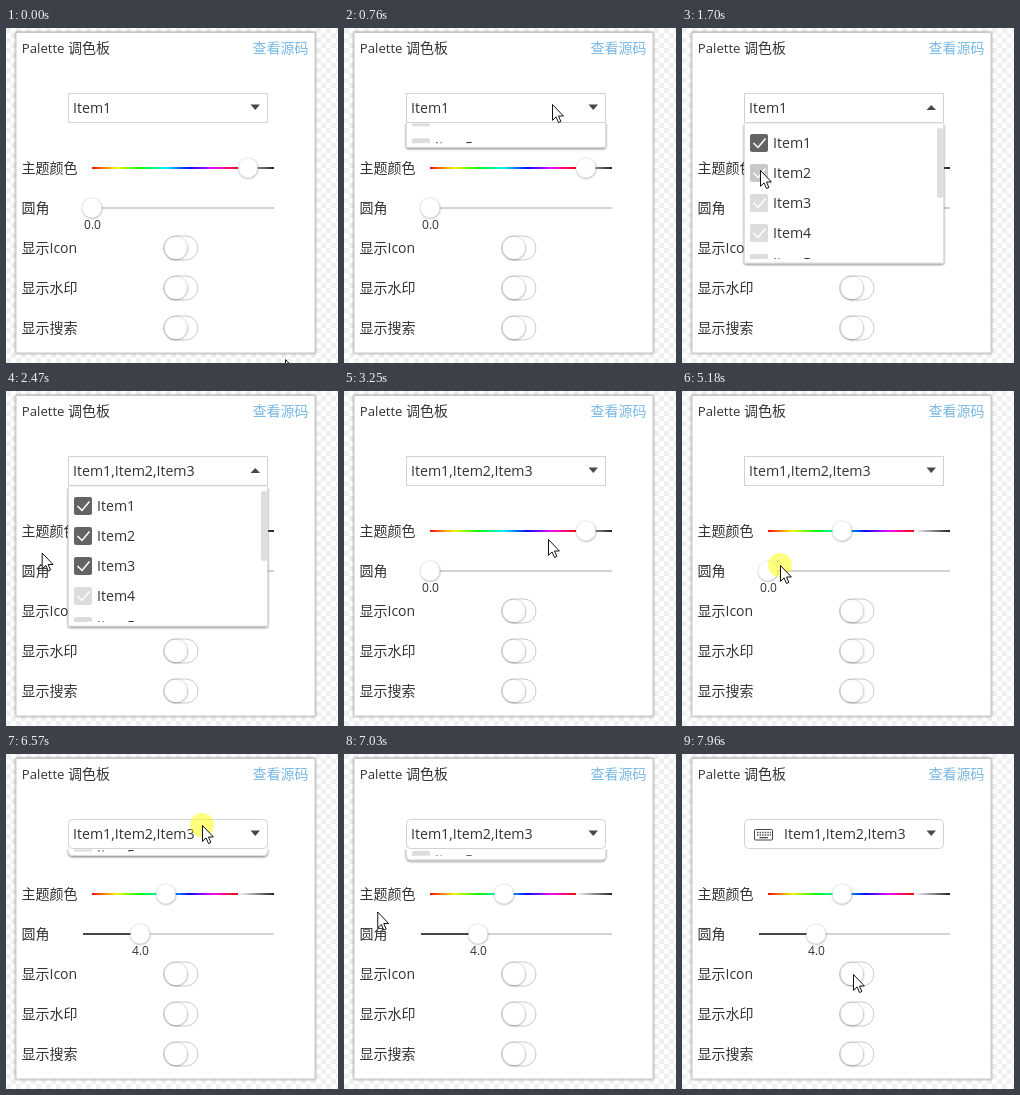
An HTML page for the animation above (8000 ms loop, 332 by 335 pixels).

```html
<!DOCTYPE html>
<html lang="zh">
<head>
<meta charset="utf-8">
<style>
html, body { margin: 0; width: 100%; height: 100%; overflow: hidden; background: #fff; }
svg { display: block; width: 332px; height: 335px; }
text { font-family: "Open Sans", "Noto Sans CJK SC", "Noto Sans CJK", sans-serif; font-size: 14px; fill: #333; }
.item { font-size: 14.2px; }
.value { font-size: 12px; text-anchor: middle; }
.knob { fill: #fff; filter: url(#soft); }
</style>
</head>
<body>
<svg viewBox="0 0 332 335">
  <defs>
    <pattern id="checks" width="10" height="10" patternUnits="userSpaceOnUse">
      <path d="M0 0h5v5h-5zM5 5h5v5h-5z" fill="#f0f0f0"/>
    </pattern>
    <linearGradient id="hues"></linearGradient>
    <linearGradient id="greys"><stop stop-color="#fff"/><stop offset="1" stop-color="#222"/></linearGradient>
    <filter id="soft" x="-30%" y="-30%" width="160%" height="160%">
      <feDropShadow dx="0.2" dy="0.5" stdDeviation="1.3" flood-opacity=".5"/>
    </filter>
    <filter id="drop" x="-5%" y="-5%" width="110%" height="112%">
      <feDropShadow dx="0" dy="1.2" stdDeviation="1.3" flood-opacity=".5"/>
    </filter>
    <filter id="edge" x="-3%" y="-3%" width="106%" height="106%">
      <feDropShadow dx="0" dy="0" stdDeviation="1.3" flood-opacity=".5"/>
    </filter>
    <clipPath id="below"><rect x="50" y="95.5" width="225" height="160"/></clipPath>
    <clipPath id="view"><rect x="62" y="97" width="200" height="134"/></clipPath>
  </defs>

  <rect width="332" height="335" fill="url(#checks)"/>
  <rect x="10" y="4.5" width="299" height="320.5" fill="#fff" stroke="#c8c8c8" filter="url(#edge)"/>

  <text x="15.8" y="25" style="font-size:13.2px">Palette</text>
  <text x="62" y="25">调色板</text>
  <text x="246.5" y="25" style="fill:#79b8e6">查看源码</text>
  <g id="labels"></g>

  <rect x="86" y="139" width="146" height="2" fill="url(#hues)"/>
  <rect x="232" y="139" width="36" height="2" fill="url(#greys)"/>
  <circle id="hueKnob" class="knob" cy="140" r="9.5"/>
  <rect x="77" y="179" width="191" height="2" fill="#d3d3d3"/>
  <rect id="fill" x="77" y="179" height="2" fill="#484848"/>
  <circle id="knob" class="knob" cy="180" r="9.5"/>
  <text id="value" class="value" y="201"></text>
  <g id="switches"></g>

  <rect id="combo" x="62.5" y="65.5" width="199" height="29" fill="#fff" stroke="#d2d2d2"/>
  <g id="icon" fill="none" stroke="#444">
    <rect x="72.5" y="75.5" width="18" height="10.5" rx="1"/>
    <path d="M75 78.5H89M75 81H89" stroke-width="1.3" stroke-dasharray="1.4 1.2"/>
    <path d="M77.5 83.6H86" stroke-width="1.3"/>
  </g>
  <text id="chosen" class="item" y="85"></text>
  <path id="arrow" fill="#484848"/>

  <g clip-path="url(#below)">
    <g id="popup">
      <rect id="sheet" x="62.5" y="95.5" width="199" height="139.5" fill="#fff" stroke="#ddd" filter="url(#drop)"/>
      <g id="list" clip-path="url(#view)"></g>
      <rect x="255" y="100" width="6" height="70" rx="2.5" fill="#dedede"/>
    </g>
  </g>

  <circle id="press" r="12" fill="#ff0" opacity=".5"/>
  <path id="cursor" d="M.5.5V16.3L4.1 12.9 6.5 18.5 8.9 17.5 6.5 12H11.4Z" fill="#fff" stroke="#111" stroke-linejoin="round"/>
</svg>
<script>
const LOOP = 8000;
const HOLD = 82;   // length of a click
const LAG = 74;    // from click to its effect
const SLIDE = 95;  // popup opening or closing
const MIN = 86;    // left end of the sliders
const STEP = 12;   // pixels per unit of corner radius
const ITEMS = [1, 2, 3, 4, 5];

const $ = id => document.getElementById(id);
const set = (id, attrs) => {
  for (const k in attrs) $(id).setAttribute(k, attrs[k]);
};
const show = (id, on) => set(id, { visibility: on ? 'visible' : 'hidden' });
const clamp = (v, lo = 0, hi = 1) => Math.min(hi, Math.max(lo, v));
const smooth = u => u * u * (3 - 2 * u);
const rowY = n => 85 + 30 * n;

$('hues').innerHTML = Array.from({ length: 7 }, (_, i) =>
  `<stop offset="${i / 6}" stop-color="hsl(${60 * i},92%,50%)"/>`).join('');
$('labels').innerHTML = ['主题颜色', '圆角', '显示Icon', '显示水印', '显示搜索']
  .map((s, i) => `<text x="15.5" y="${145 + 40 * i}">${s}</text>`).join('');
$('switches').innerHTML = [220, 260, 300].map(y => `
  <rect x="157.5" y="${y - 12}" width="34.5" height="24" rx="12" fill="#fff" stroke="#cbcbcb"/>
  <circle class="knob" cx="170" cy="${y}" r="11"/>`).join('');
$('list').innerHTML = ITEMS.map(n => `
  <rect id="box${n}" x="68" y="${rowY(n) - 9}" width="18" height="18" rx="2"/>
  <path d="M71.5 ${rowY(n)}l4.5 4.5 7.5-9" fill="none" stroke="#fff" stroke-width="1.5"/>
  <text class="item" x="91" y="${rowY(n) + 5}">Item${n}</text>`).join('');

// Where the cursor rests; sag bends the way there downwards
const stops = [
  { x: 279, y: 331, from: 0, till: 70 },
  { x: 208, y: 76, from: 530, till: 1010 },
  { x: 78, y: 142, from: 1380, till: 1860 },
  { x: 78, y: 167, from: 2010, till: 2310 },
  { x: 24, y: 160, from: 2540, till: 2860 },
  { x: 204, y: 148, from: 3250, till: 3340 },
  { x: 245, y: 134, from: 3630, till: 3690 },
  { x: 159, y: 135, from: 3920, till: 4010 },
  { x: 152, y: 157, from: 4320, till: 4360 },
  { x: 98, y: 174, from: 4950, till: 5190, sag: 17 },
  { x: 134, y: 175, from: 5340, till: 5500 },
  { x: 196, y: 71, from: 6420, till: 6650, sag: 80 },
  { x: 28, y: 150, from: 6850, till: 6940 },
  { x: 171, y: 220, from: 7730, till: LOOP, sag: 14 }
];
const toggles = [670, 2700, 6492, 6870];
const picks = [1780, 2155];
const iconClick = 7872;
const clicks = [...toggles, ...picks, iconClick];
const drags = [[3630, 3990], [5090, 5500]];
const hueDrag = [3690, 3920];
const radiusDrag = [5190, 5340];

function cursorAt(t) {
  const i = stops.findIndex(s => t < s.till);
  const b = stops[i], a = stops[i - 1];
  if (!a || t >= b.from) return b;
  const u = (t - a.till) / (b.from - a.till);
  const e = smooth(u);
  return {
    x: a.x + (b.x - a.x) * e,
    y: a.y + (b.y - a.y) * e + (b.sag || 0) * Math.sin(Math.PI * u)
  };
}

function drawSliders(t) {
  const hue = Math.min(242, cursorAt(clamp(t, ...hueDrag)).x + 1);
  const held = cursorAt(clamp(t, ...radiusDrag)).x;
  const radius = t > radiusDrag[0] ? Math.round((held - MIN) / STEP) : 0;
  const x = MIN + radius * STEP;
  set('hueKnob', { cx: hue });
  set('knob', { cx: x });
  set('fill', { width: x - 77 });
  set('value', { x: x + .5 });
  $('value').textContent = radius.toFixed(1);
  set('combo', { rx: radius });
  set('sheet', { rx: Math.max(1, radius) });
}

function drawCombo(t, x, y) {
  const count = 1 + picks.filter(c => t >= c + LAG).length;
  const withIcon = t >= iconClick + LAG;
  $('chosen').textContent = ITEMS.slice(0, count).map(n => 'Item' + n).join(',');
  set('chosen', { x: withIcon ? 102 : 67 });
  show('icon', withIcon);
  for (const n of ITEMS) {
    const hover = Math.abs(x - 77) < 9 && Math.abs(y - rowY(n)) < 13;
    set('box' + n, { fill: n <= count ? '#646464' : hover ? '#c8c8c8' : '#dcdcdc' });
  }

  const open = toggles.reduce((sum, c, i) =>
    sum + (i % 2 ? -1 : 1) * clamp((t - c - LAG) / SLIDE), 0);
  show('popup', open > 0);
  set('popup', { transform: `translate(0 ${-141 * (1 - open)})` });
  set('arrow', { d: open > .2 ? 'M244.5 82h9.5l-4.75-5z' : 'M244.5 76.5h9.5l-4.75 5.5z' });
}

function draw(t) {
  const { x, y } = cursorAt(t);
  set('cursor', { transform: `translate(${x} ${y})` });
  set('press', { cx: x, cy: y });
  show('press', clicks.some(c => t >= c && t < c + HOLD) || drags.some(([a, b]) => t >= a && t < b));
  drawSliders(t);
  drawCombo(t, x, y);
}

const start = performance.now();
function tick() {
  draw((performance.now() - start) % LOOP);
  requestAnimationFrame(tick);
}
draw(0);
requestAnimationFrame(tick);
</script>
</body>
</html>
```
